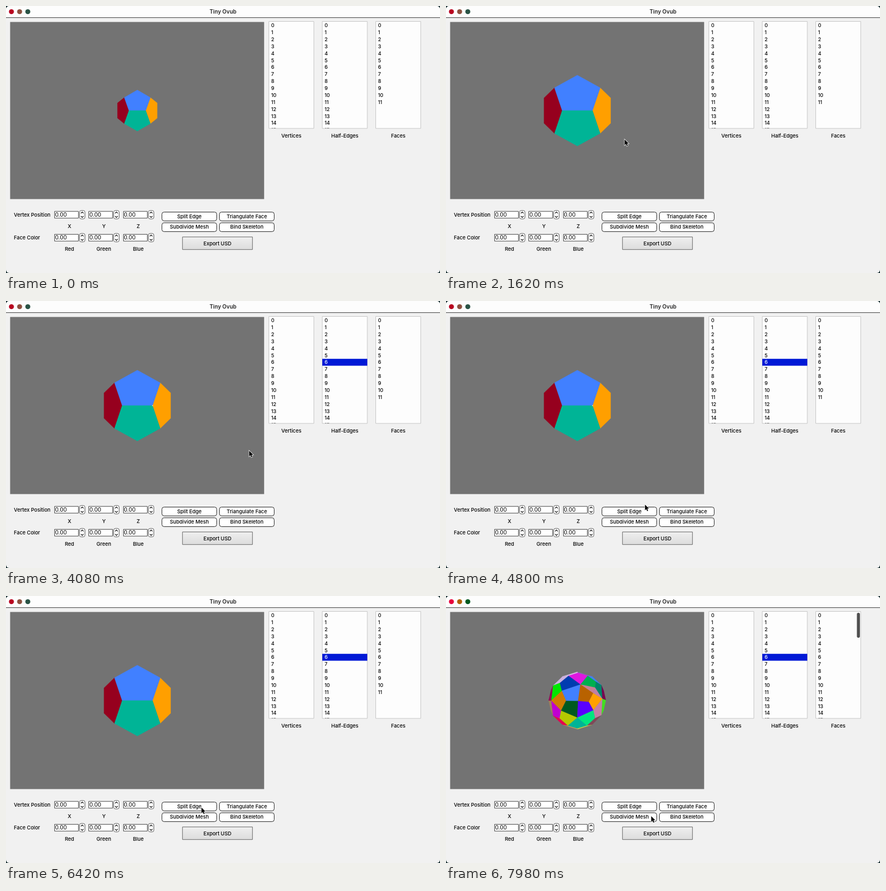
Write an HTML page with a canvas that moves like this. It is 800 px wide and 493 px high and loops after 8000 ms.

```html
<!DOCTYPE html>
<html lang="en">
<head>
<meta charset="utf-8">
<title>Mesh editor</title>
<style>
  html, body { margin: 0; width: 100%; height: 100%; overflow: hidden; background: #f1f1f1; }
  canvas { display: block; width: 800px; height: 493px; }
</style>
</head>
<body>
<canvas id="stage" width="800" height="493"></canvas>
<script>
const ctx = document.getElementById('stage').getContext('2d');
const LOOP = 8000, STEP = 60, PHI = (1 + Math.sqrt(5)) / 2;
const FONT = 'Inter, "Open Sans", sans-serif';

// vectors
const dot = (a, b) => a[0] * b[0] + a[1] * b[1] + a[2] * b[2];
const cross = (a, b) => [a[1] * b[2] - a[2] * b[1], a[2] * b[0] - a[0] * b[2], a[0] * b[1] - a[1] * b[0]];
const mix = (...terms) => [0, 1, 2].map(k => terms.reduce((sum, [w, v]) => sum + w * v[k], 0));
const mean = list => mix(...list.map(v => [1 / list.length, v]));

// dodecahedron seen along a two-fold axis
const signs = [1, -1], verts = [], normals = [];
for (const x of signs) for (const y of signs) for (const z of signs) verts.push([x, y, z]);
for (const x of signs) for (const y of signs) {
  verts.push([x / PHI, 0, y * PHI], [0, x * PHI, y / PHI], [x * PHI, y / PHI, 0]);
  normals.push([0, x, y * PHI], [x * PHI, 0, y], [x, y * PHI, 0]);
}
const faces = normals.map(n => {
  const u = cross([0, 1, 0], n), v = cross(n, u);
  const unit = w => Math.sqrt(dot(w, w));
  const turn = i => (Math.atan2(dot(verts[i], v) / unit(v), dot(verts[i], u) / unit(u)) + 3.2) % (2 * Math.PI);
  return verts.map((p, i) => i).filter(i => dot(verts[i], n) > 2.5).sort((a, b) => turn(a) - turn(b));
});
const faceColors = { 0: '#4180ff', 1: '#ff9f00', 6: '#00b496', 7: '#96001e' };
const baseMesh = faces.map((f, i) => ({ points: f.map(j => verts[j]), color: faceColors[i] || '#555' }));

// corner colors after subdivision, per face
const cornerColors = {
  0: ['#4180ff', '#b86200', '#c87f96', '#00b050', '#e018e0', '#003cb0'],
  1: ['#ffa000', '#c47fa4', '#40e020', '#780050', '#008468', '#c080a4'],
  2: ['#3f80f4', '#207050', '#805090', '#60a0c0', '#9060c0'],
  5: ['#c8d840', '#60b060', '#806040', '#506080', '#804858'],
  6: ['#b4c800', '#00b496', '#00e680', '#5a00ff', '#005a20'],
  7: ['#a08258', '#c000d0', '#d07c00', '#00e600', '#98005a'],
  8: ['#508080', '#105a40', '#cbb0e0', '#dcc0ea', '#8090c0'],
  11: ['#709040', '#b8a060', '#e60050', '#805050', '#705070']
};

function subdivide(points, polys) {
  const centers = polys.map(f => mean(f.map(i => points[i])));
  const key = (a, b) => Math.min(a, b) + ':' + Math.max(a, b);
  const edges = {};
  polys.forEach((f, k) => f.forEach((a, i) => {
    const b = f[(i + 1) % f.length];
    (edges[key(a, b)] ||= { ends: [a, b], sides: [] }).sides.push(centers[k]);
  }));
  const edgePoint = (a, b) => {
    const e = edges[key(a, b)];
    return mean([...e.ends.map(i => points[i]), ...e.sides]);
  };
  const smooth = points.map((p, i) => {
    const around = centers.filter((c, k) => polys[k].includes(i));
    const mids = Object.values(edges).filter(e => e.ends.includes(i)).map(e => mean(e.ends.map(j => points[j])));
    const n = mids.length;
    return mix([1 / n, mean(around)], [2 / n, mean(mids)], [(n - 3) / n, p]);
  });
  return polys.flatMap((f, k) => f.map((a, i) => ({
    points: [smooth[a], edgePoint(a, f[(i + 1) % f.length]), centers[k], edgePoint(f.at(i - 1), a)],
    color: (cornerColors[k] || [])[i] || '#666'
  })));
}

// one extra vertex in the middle of the selected edge
const splitVerts = [...verts, mean([verts[0], verts[8]])];
const splitFaces = faces.map(f => f.flatMap((a, i) => {
  const b = f[(i + 1) % f.length];
  return a + b === 8 && a * b === 0 ? [a, verts.length] : [a];
}));
const fineMesh = subdivide(splitVerts, splitFaces);

function drawMesh(mesh, distance) {
  const depth = p => p.points.reduce((s, v) => s + v[2], 0) / p.points.length;
  for (const poly of [...mesh].sort((a, b) => depth(a) - depth(b))) {
    const flat = poly.points.map(([x, y, z]) => [x, y].map(c => c * 381 / (distance - z)));
    const area = flat.reduce((s, [x, y], i) => {
      const [nx, ny] = flat[(i + 1) % flat.length];
      return s + x * ny - nx * y;
    }, 0);
    if (area <= 0) continue;
    ctx.beginPath();
    flat.forEach(([x, y]) => ctx.lineTo(242.1 + x, 193.1 - y));
    ctx.closePath();
    ctx.fillStyle = ctx.strokeStyle = poly.color;
    ctx.lineWidth = 0.4;
    ctx.fill();
    ctx.stroke();
  }
}

// interface pieces
function text(str, x, y, { size = 9.4, align = 'center', color = '#000', weight = 500 } = {}) {
  ctx.font = `${weight} ${size}px ${FONT}`;
  ctx.textAlign = align;
  ctx.textBaseline = 'alphabetic';
  ctx.fillStyle = color;
  ctx.fillText(str, x, y + size * 0.36);
}

function box(x, y, w, h, fill, stroke, radius = 0, line = 1) {
  ctx.beginPath();
  ctx.roundRect(x, y, w, h, radius);
  ctx.fillStyle = fill;
  ctx.fill();
  if (!stroke) return;
  ctx.strokeStyle = stroke;
  ctx.lineWidth = line;
  ctx.stroke();
}

function disc(x, y, r, color) {
  ctx.beginPath();
  ctx.arc(x, y, r, 0, 7);
  ctx.fillStyle = color;
  ctx.fill();
}

function list(x, label, count, selected) {
  box(x + 0.5, 28.5, 83, 197.5, '#fdfdfd', '#c6c6c6');
  ctx.save();
  ctx.beginPath();
  ctx.rect(x + 0.5, 29, 83, 196.4);
  ctx.clip();
  for (let i = 0; i < count; i++) {
    const y = 35.9 + i * 12.87, on = i === selected;
    if (on) box(x + 0.5, y - 6.4, 83, 12.8, '#0019d6');
    text(i, x + 4.7, y, { size: 9.2, align: 'left', color: on ? '#fff' : '#000' });
  }
  ctx.restore();
  text(label, x + 42, 240);
}

function chevrons(x, y) {
  box(x + 0.5, y - 7.5, 10, 15.5, '#fff', '#555', 3);
  ctx.strokeStyle = '#111';
  ctx.lineWidth = 1.2;
  for (const d of signs) {
    ctx.beginPath();
    ctx.moveTo(x + 3, y + 0.3 + d * 2.6);
    ctx.lineTo(x + 5.5, y + 0.3 + d * 5);
    ctx.lineTo(x + 8, y + 0.3 + d * 2.6);
    ctx.stroke();
  }
}

function spinRow(title, y, labels) {
  text(title, 14.5, y, { align: 'left' });
  labels.forEach((label, i) => {
    const x = 89 + i * 63.4;
    box(Math.round(x) + 0.5, y - 6.2, 44, 12.5, '#fff', '#444');
    text('0.00', x + 1.4, y, { size: 10.2, align: 'left', weight: 400 });
    chevrons(Math.round(x) + 46, y - 0.3);
    text(label, x + 28, y + 21.3);
  });
}

function button(label, x, y, pressed) {
  box(x + 0.4, y + 0.5, 101, 16.3, pressed ? '#c9c9c9' : '#fff', '#222', 4);
  text(label, x + 51, y + 8.2);
}

function drawWindow(selected, pressed, fine) {
  ctx.fillStyle = '#10282a';
  ctx.fillRect(0, 0, 800, 493);
  box(0, 0, 800, 493, '#f1f1f1', null, 6);
  box(0, 0, 800, 21, '#fdfdfd', null, [6, 6, 0, 0]);
  box(0, 21, 800, 1, '#3c3c3c');
  const lights = fine ? ['#e8003c', '#b06000', '#005a20'] : ['#b8001f', '#8e5140', '#2a5446'];
  lights.forEach((c, i) => disc(10 + i * 15.1, 10.5, 4.6, c));
  text('Tiny Ovub', 400, 10.5, { size: 10, weight: 600, color: '#222' });

  box(7.6, 29.4, 468.2, 327.2, '#737373');
  list(484, 'Vertices', 16);
  list(582.5, 'Half-Edges', 16, selected ? 6 : -1);
  list(681, 'Faces', fine ? 16 : 12);
  if (fine) box(757.4, 31, 5.6, 46, '#505050', null, 3);

  spinRow('Vertex Position', 385.4, ['X', 'Y', 'Z']);
  spinRow('Face Color', 427.8, ['Red', 'Green', 'Blue']);
  button('Split Edge', 287, 380, pressed === 'split');
  button('Triangulate Face', 393, 380);
  button('Subdivide Mesh', 287, 399.8, pressed === 'subdivide');
  button('Bind Skeleton', 393, 399.8);
  const shade = ctx.createLinearGradient(0, 426, 0, 450);
  shade.addColorStop(0, '#efefef');
  shade.addColorStop(1, '#dcdcdc');
  box(325.3, 426.4, 129, 23.3, shade, '#666');
  text('Export USD', 389.8, 438.4);
}

// pointer: time, x, y
const path = [
  [540, 318, 260], [1380, 327, 249], [1620, 329, 246], [2160, 470, 164], [2760, 590, 113],
  [2940, 594, 111], [3300, 594, 111], [3840, 448, 276], [4080, 448, 276], [4980, 357, 387],
  [5400, 360, 390], [6660, 360, 390], [7140, 406, 393], [7200, 406, 393], [7440, 379, 406], [7500, 378, 406]
];
const clicks = [
  { from: 3060, to: 3240 },
  { from: 5460, to: 5640, button: 'split' },
  { from: 7560, to: 7800, button: 'subdivide' }
];

function pointerAt(t) {
  const i = path.findIndex(k => k[0] > t);
  if (i === 0) return null;
  if (i < 0) return path.at(-1).slice(1);
  const [a, b] = [path[i - 1], path[i]];
  const p = (t - a[0]) / (b[0] - a[0]), e = p * p * (3 - 2 * p);
  return [1, 2].map(k => a[k] + (b[k] - a[k]) * e);
}

function drawPointer([x, y], clicking) {
  if (clicking) {
    ctx.beginPath();
    ctx.arc(x - 0.5, y + 0.8, 16.3, 0, 7);
    ctx.strokeStyle = '#111';
    ctx.lineWidth = 1.3;
    ctx.stroke();
  }
  const arrow = [[0, 0], [0, 10.5], [2.4, 8.3], [4, 12], [5.8, 11.2], [4.2, 7.6], [7.4, 7.4]];
  ctx.beginPath();
  arrow.forEach(([dx, dy]) => ctx.lineTo(x + 0.3 + dx, y + 0.5 + dy));
  ctx.closePath();
  ctx.strokeStyle = '#fff';
  ctx.lineWidth = 1.4;
  ctx.stroke();
  ctx.fillStyle = '#000';
  ctx.fill();
}

function draw(t) {
  const click = clicks.find(c => t >= c.from && t < c.to);
  const selected = t >= 3060, fine = t >= 7800;
  const zoom = Math.min(t / 360, 1);
  drawWindow(selected, click && click.button, fine);
  drawMesh(fine ? fineMesh : baseMesh, 16.84 - 6.8 * zoom);
  if (selected && t < 5640) box(269.5, 192.5, 1.5, 1.5, '#f4e8c8');
  const pointer = pointerAt(t);
  if (pointer) drawPointer(pointer, click);
}

function tick(now) {
  draw(Math.floor(now % LOOP / STEP) * STEP);
  requestAnimationFrame(tick);
}
requestAnimationFrame(tick);
</script>
</body>
</html>
```
